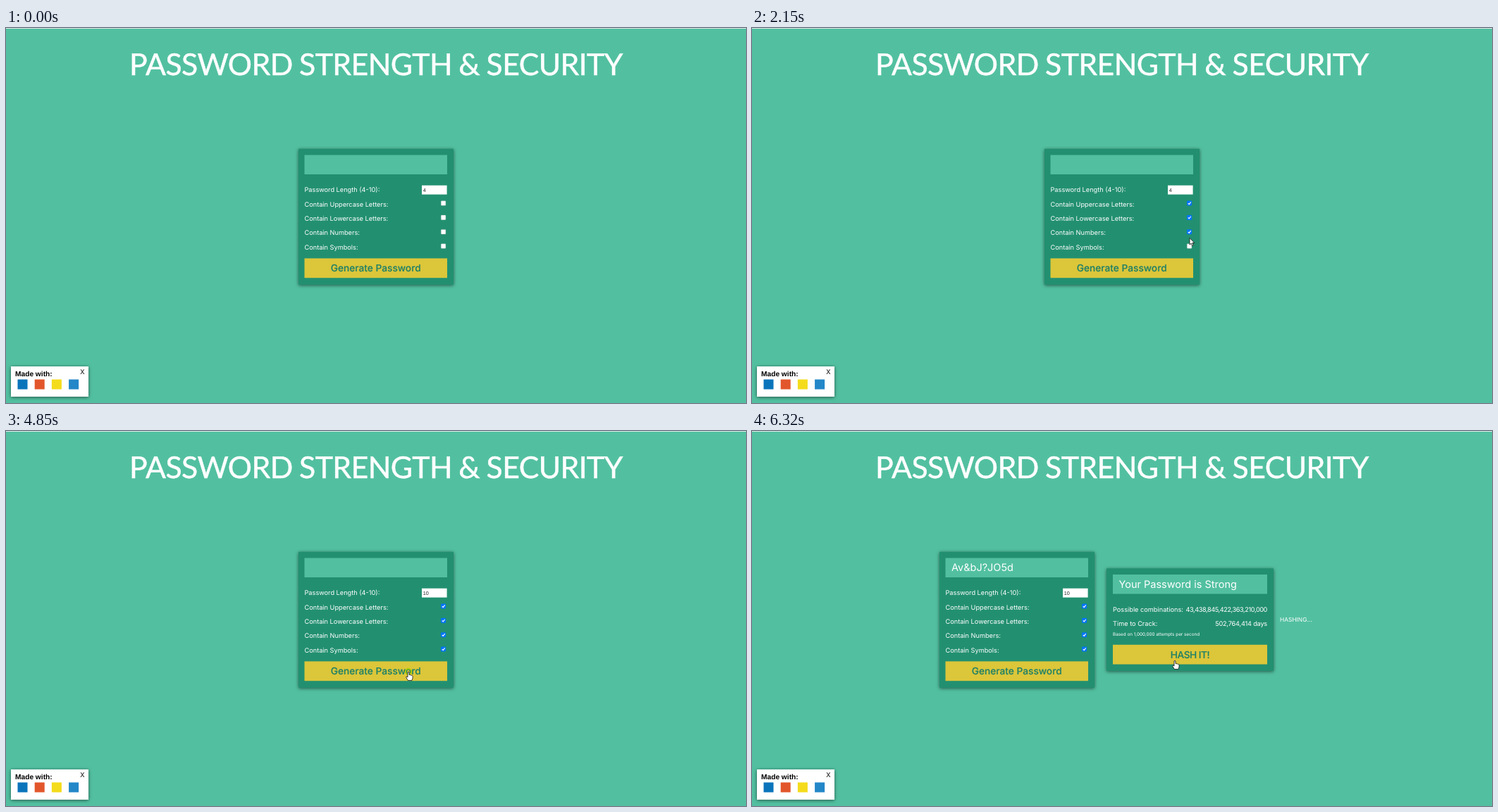
These frames come from a looping animation (1050 by 533 pixels, 8 s). An HTML page:

```html
<!DOCTYPE html>
<html lang="en">
<head>
<meta charset="utf-8">
<title>Password strength</title>
<style>
  html, body { margin: 0; height: 100%; overflow: hidden; background: #52c0a0; }
  svg { display: block; width: 100vw; height: 100vh; }
  text { font: 9.2px Inter, sans-serif; fill: #fff; text-rendering: geometricPrecision; }
  .title { font: 42.8px Lato, sans-serif; letter-spacing: -.6px; word-spacing: -1px; stroke: #fff; stroke-width: .5; }
  .field { font-size: 14.5px; }
  .button { font-size: 13.7px; font-weight: 500; fill: #1f8067; stroke: #1f8067; stroke-width: .15; }
  .caps { letter-spacing: -.5px; }
  .number { letter-spacing: -.43px; }
  .days { letter-spacing: -.2px; }
  .note { font-size: 6.35px; }
  .status { font-size: 8.4px; }
  .input { font: 7.2px "Liberation Sans", Arial, sans-serif; fill: #222; }
  .made { font: bold 10.2px "Liberation Sans", Arial, sans-serif; fill: #000; }
  .close { font-size: 9.2px; fill: #000; }
  .middle { text-anchor: middle; }
  .end { text-anchor: end; }
  .card { fill: #229070; filter: drop-shadow(0 1.5px 2.5px rgba(0, 0, 0, .55)); }
  .slot { fill: #52c0a0; }
  .gold { fill: #dcc63a; }
</style>
</head>
<body>
<svg viewBox="0 0 1050 533">
  <rect width="1050" height="533" fill="#52c0a0"/>
  <rect width="1050" height="1" fill="#e4ebe8"/>
  <text class="title middle" x="525" y="66.5">PASSWORD STRENGTH &amp; SECURITY</text>

  <g id="generator">
    <rect class="card" x="415" y="171.8" width="220" height="193"/>
    <rect class="slot" x="423.5" y="180.5" width="202.5" height="27.5"/>
    <text class="field" id="password" x="432" y="199"></text>
    <text x="423.5" y="233.2">Password Length (4-10):</text>
    <rect x="590" y="223.7" width="35.6" height="12.9" fill="#fff"/>
    <g id="focus" fill="none">
      <rect x="589" y="222.8" width="37.6" height="14.8" rx="1.5" stroke="#fff"/>
      <rect x="590.2" y="224" width="35.2" height="12.4" rx=".8" stroke="#101010" stroke-width="1.5"/>
    </g>
    <rect id="selection" x="591.5" y="226" width="5" height="8.5" fill="#3390ff"/>
    <text class="input" id="length" x="591.8" y="232.8"></text>
    <path id="spinner" d="M617.3 229.3l2.3-2.6 2.3 2.6zM617.3 231l2.3 2.6 2.3-2.6z" fill="#555"/>
    <g id="options"></g>
    <rect class="gold" x="423.5" y="327.4" width="202.5" height="27.8"/>
    <text class="button middle" x="524.7" y="346.2">Generate Password</text>
  </g>

  <g id="report">
    <rect class="card" x="525" y="195.3" width="237" height="145.7"/>
    <rect class="slot" x="534" y="204" width="219" height="27.5"/>
    <text class="field" x="542.5" y="222.5">Your Password is Strong</text>
    <text x="534" y="257">Possible combinations:</text>
    <text class="number end" x="753" y="257">43,438,845,422,363,210,000</text>
    <text x="534" y="277.3">Time to Crack:</text>
    <text class="days end" x="753" y="277.3">502,764,414 days</text>
    <text class="note" x="534" y="291">Based on 1,000,000 attempts per second</text>
    <rect class="gold" x="534" y="303.8" width="219" height="27.8"/>
    <text class="button caps middle" x="643.5" y="322.6">HASH IT!</text>
  </g>
  <text class="status" id="hashing" x="749" y="270.5">HASHING...</text>

  <rect class="card" x="7" y="481" width="110" height="43" style="fill:#fff"/>
  <text class="made" x="13" y="495">Made with:</text>
  <text class="close" x="105.3" y="492.2">X</text>
  <g id="badges"></g>

  <circle id="ring" r="4" fill="none" stroke="#abc900" stroke-width="1.8"/>
  <g id="cursor" stroke-linejoin="round">
    <path id="arrow" d="M0 0V9.6L2.2 7.6 3.7 11 5.3 10.3 3.8 7H6.9Z" fill="#fff" stroke="#111" stroke-width=".8"/>
    <path id="hand" d="M-1 1Q0 -.4 1 1V4.6Q2 4 2.8 5Q3.8 4.5 4.4 5.5Q5.6 5 6 6.4V9.2L4.9 12.6H-.6L-3.2 8.3Q-3.4 6.7-1.9 7.2L-1 8.1Z" fill="#fff" stroke="#111" stroke-width=".8"/>
    <path id="beam" d="M-2-5.5Q0-5.5 0-4.5Q0-5.5 2-5.5M0-4.5V4.5M-2 5.5Q0 5.5 0 4.5Q0 5.5 2 5.5" fill="none" stroke="#111" stroke-width=".9"/>
  </g>
</svg>
<script>
const LOOP = 8000, TICK = 77;
const $ = id => document.getElementById(id);
const show = (id, on) => $(id).setAttribute('visibility', on ? 'visible' : 'hidden');
const move = (id, x, y = 0) => $(id).setAttribute('transform', `translate(${x} ${y})`);

// Cursor path: tick, x, y
const path = [
  [3, 869, 446], [5, 775, 372], [7, 650, 280], [9, 582, 237], [11, 596, 239], [13, 615, 245],
  [14, 620, 248], [17, 621, 250], [19, 622, 270], [22, 621, 270], [25, 621, 290], [27, 621, 290],
  [29, 621, 307], [32, 620, 304], [35, 618, 276], [38, 612, 241], [40, 598, 230], [42, 580, 229],
  [44, 573, 229], [48, 574, 232], [50, 584, 254], [52, 592, 278], [53, 592, 288],
  [56, 584, 322], [60, 571, 342], [75, 571, 342], [80, 599, 325], [82, 600, 326]
];
const options = [
  { label: 'Uppercase Letters', checked: 17 },
  { label: 'Lowercase Letters', checked: 22 },
  { label: 'Numbers', checked: 27 },
  { label: 'Symbols', checked: 31 }
];
const presses = [16, 21, 26, 30, 62, 63, 80, 81];
const GENERATED = 64, HASHED = 82;

$('options').innerHTML = options.map(({ label }, i) => {
  const y = 245.7 + i * 20.35;
  return `<text x="423.5" y="${y + 7.9}">Contain ${label}:</text>
    <rect id="box${i}" x="617.3" y="${y}" width="6.6" height="6.6" rx=".8" stroke-width=".4"/>
    <path id="tick${i}" d="M618.8 ${y + 3.4}l1.4 1.5 2.5-3.2" fill="none" stroke="#fff" stroke-width="1.1"/>`;
}).join('');
$('badges').innerHTML = ['#0a74bb', '#e2562b', '#f4dc1c', '#2387c8'].map((color, i) =>
  `<rect x="${16.5 + i * 24.2}" y="499.5" width="14" height="14" fill="${color}"/>`).join('');

function cursorAt(tick) {
  const next = path.findIndex(p => p[0] > tick);
  if (next < 0) return path.at(-1).slice(1);
  if (next === 0) return path[0].slice(1);
  const [t0, x0, y0] = path[next - 1], [t1, x1, y1] = path[next];
  const f = (tick - t0) / (t1 - t0);
  return [x0 + (x1 - x0) * f, y0 + (y1 - y0) * f];
}

function draw(time) {
  const tick = Math.floor(time / TICK + .13);
  const within = (from, to) => tick >= from && tick < to;
  const [x, y] = cursorAt(tick);
  const generated = tick >= GENERATED, hashed = tick >= HASHED;
  const shift = hashed ? -22 : 0;

  move('generator', generated ? shift - 127 : 0);
  move('report', shift);
  show('report', generated);
  show('hashing', hashed);
  $('password').textContent = generated ? 'Av&bJ?JO5d' : '';

  const focused = within(40, 62), selected = within(42, 48);
  show('focus', focused);
  show('spinner', focused);
  show('selection', selected);
  $('length').textContent = tick < 48 ? '4' : tick < 54 ? '1' : '10';
  $('length').style.fill = selected ? '#fff' : '';

  options.forEach(({ checked }, i) => {
    const on = tick >= checked;
    const hover = !generated && Math.abs(x - 620.7) < 4 && Math.abs(y - 249 - i * 20.35) < 4;
    const blue = hover ? '#0a52b8' : '#0075ff';
    $('box' + i).setAttribute('fill', on ? blue : '#fff');
    $('box' + i).setAttribute('stroke', on ? blue : hover ? '#555' : '#a5b5ae');
    show('tick' + i, on);
  });

  const hand = within(59, GENERATED) || tick >= 79;
  const beam = within(40, 49);
  move('cursor', x, y);
  show('arrow', tick >= 3 && !hand && !beam);
  show('hand', hand);
  show('beam', beam);
  move('ring', x, y);
  show('ring', presses.includes(tick));
}

function loop() {
  draw(performance.now() % LOOP);
  requestAnimationFrame(loop);
}
loop();
</script>
</body>
</html>
```
